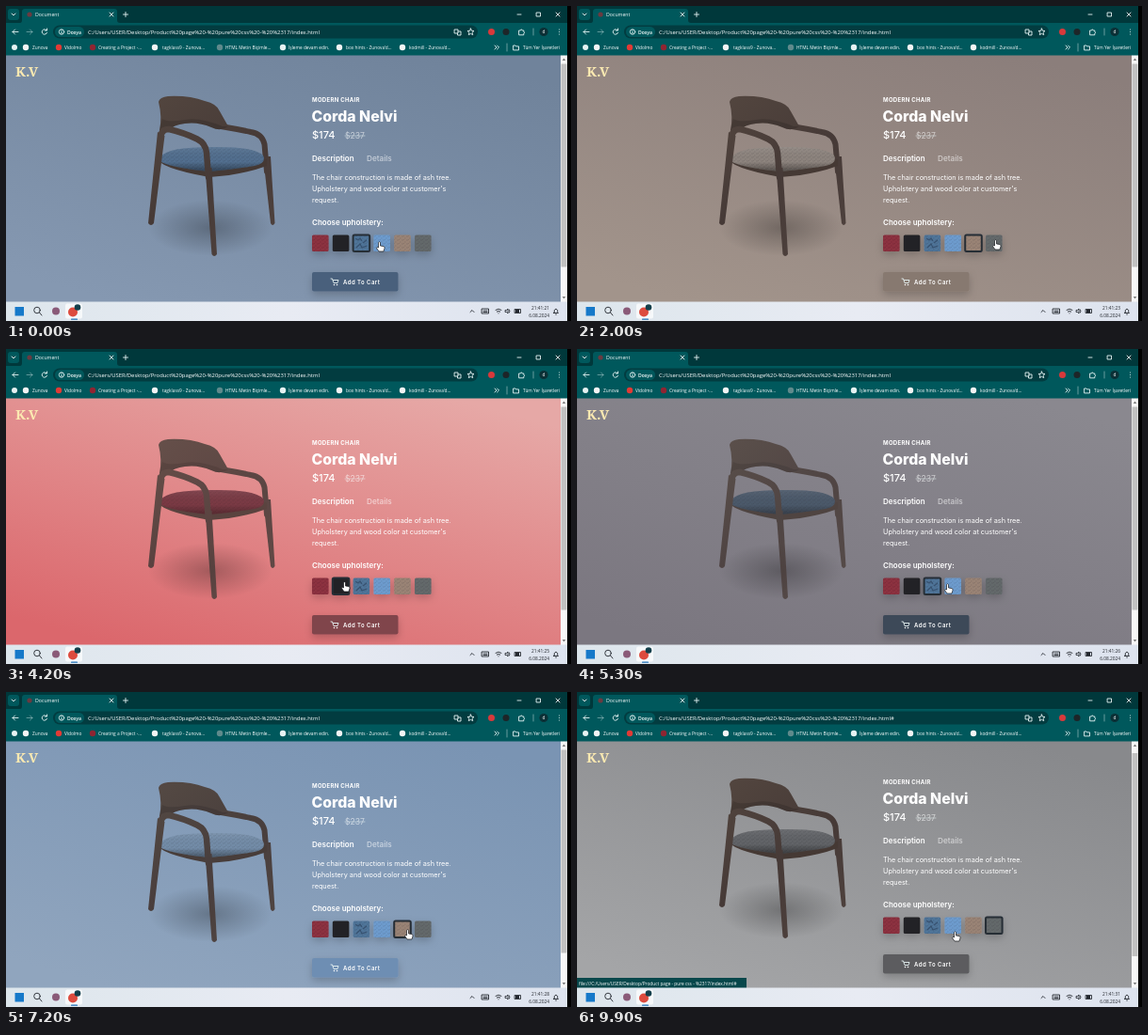
Recreate the animation shown at these times as an HTML page. Size 600 by 335 pixels, loop 10 s.

```html
<!DOCTYPE html>
<html lang="en">
<head>
<meta charset="utf-8">
<title>Product page</title>
<style>
  html, body { margin: 0; width: 100%; height: 100%; overflow: hidden; background: #000; }
  svg { display: block; width: 100vw; height: 100vh; }
  text { fill: #fff; white-space: pre; }
  .ui { font-family: "Open Sans", "Noto Sans", sans-serif; font-size: 4.8px; }
  .shop { font-family: Inter, "Open Sans", sans-serif; font-size: 7.3px; }
  .line { fill: none; stroke: #e6f2f2; stroke-width: .9; stroke-linecap: round; stroke-linejoin: round; }
  .dark { stroke: #23272e; }
  .wood { fill: none; stroke: url(#grain); stroke-linecap: round; stroke-linejoin: round; }
  #task text { fill: #20242b; text-anchor: end; }
</style>
</head>
<body>
<svg viewBox="0 0 600 335">
  <defs>
    <linearGradient id="sky" x1=".8" y1="0" x2=".2" y2="1">
      <stop id="skyTop"/><stop id="skyLow" offset="1"/>
    </linearGradient>
    <linearGradient id="grain" gradientUnits="userSpaceOnUse" x1="155" y1="95" x2="285" y2="265">
      <stop stop-color="#53463f"/><stop offset=".5" stop-color="#463a37"/><stop offset="1" stop-color="#4f423e"/>
    </linearGradient>
    <linearGradient id="shade" x2="0" y2="1">
      <stop stop-color="#fff" stop-opacity=".08"/><stop offset=".6" stop-opacity="0"/><stop offset="1" stop-opacity=".4"/>
    </linearGradient>
    <linearGradient id="bar">
      <stop stop-color="#dde6ec"/><stop offset=".5" stop-color="#e8ebf3"/><stop offset="1" stop-color="#dde3ee"/>
    </linearGradient>
    <radialGradient id="ground"><stop stop-opacity=".26"/><stop offset="1" stop-opacity="0"/></radialGradient>
    <pattern id="weave" width="5" height="4" patternUnits="userSpaceOnUse">
      <path d="M0 1h2M3 3h1.5M2.5 0v1" stroke="#000" stroke-opacity=".14" stroke-width=".7"/>
    </pattern>
    <filter id="soft" x="-30%" y="-60%" width="160%" height="260%">
      <feDropShadow dx="0" dy="3.500" stdDeviation="4.500" flood-opacity=".2"/>
    </filter>
    <path id="seat" d="M165 160Q171 150 218 150Q264 149 273 159Q277 167 264 170Q242 174 216 176Q177 172 165 166Z"/>
  </defs>

  <g id="page">
    <rect y="52" width="589" height="263" fill="url(#sky)"/>
    <g id="scroll">
      <ellipse cx="217" cy="236" rx="66" ry="30" fill="url(#ground)"/>
      <g id="chair">
        <path class="wood" stroke-width="6" d="M228 128Q246 131 260 134Q272 136 274.500 147L277 176"/>
        <path fill="url(#grain)" d="M273 160L281 160L285.500 231Q283 235 281 231Z"/>
        <path fill="#453934" d="M159.500 160Q160 172 216 182Q250 180 277 170V163L215 171Z"/>
        <use href="#seat" id="cushion"/>
        <use href="#seat" fill="url(#weave)"/>
        <use href="#seat" fill="url(#shade)"/>
        <path fill="url(#grain)" d="M162 102Q163 97 172 96Q195 95 211 101Q224 104 227 112L236 128Q228 134 218 129Q204 123 190 125Q178 126 172 133L163 132Q166 118 162 102Z"/>
        <path fill="#000" opacity=".14" d="M166 120Q172 124 190 121Q206 118 230 128L236 128Q228 134 218 129Q204 123 190 125Q178 126 172 133L163 132Z"/>
        <path fill="url(#grain)" d="M161 134L168.500 138L157 231Q154 235 151 231Z"/>
        <path class="wood" stroke-width="6.500" d="M164.500 139Q165 131 173 131Q190 135 203 141.500Q212 146 213 156L215 182"/>
        <path fill="url(#grain)" d="M211.500 172L218.500 172L224 264Q221 268 218.500 264Z"/>
      </g>
      <g class="shop">
        <text x="325" y="102" font-size="6" font-weight="700" letter-spacing=".3">MODERN CHAIR</text>
        <text x="324.500" y="122.500" font-size="15.800" font-weight="800">Corda Nelvi</text>
        <text x="325" y="141" font-size="11" font-weight="500">$174</text>
        <g opacity=".6">
          <text x="360" y="141" font-size="8.600">$237</text>
          <path class="line" d="M360 138H381"/>
          <text x="383" y="165" font-size="8.200" font-weight="500">Details</text>
        </g>
        <text x="325" y="165" font-size="8" font-weight="600">Description</text>
        <text x="325" y="185">The chair construction is made of ash tree.</text>
        <text x="325" y="197">Upholstery and wood color at customer's</text>
        <text x="325" y="209">request.</text>
        <text x="325" y="233" font-size="8" font-weight="600">Choose upholstery:</text>
        <g id="swatches" filter="url(#soft)"></g>
        <rect id="button" x="325" y="283" width="91.500" height="20.500" rx="2" filter="url(#soft)"/>
        <path class="line" d="M345 290h1.500l1.500 4.500h4l1-3h-5.500"/>
        <circle cx="348.500" cy="296.500" r=".8" fill="#fff"/><circle cx="351.500" cy="296.500" r=".8" fill="#fff"/>
        <text x="358" y="295.500" font-size="6" font-weight="600" letter-spacing=".45">Add To Cart</text>
      </g>
    </g>
    <text x="10" y="74.700" font-family="Noto Serif, serif" font-size="15" font-weight="900" style="fill:#fbe9b1">K.V</text>
    <rect x="589" y="52" width="7" height="263" fill="#f7f7f7"/>
    <path fill="#777" d="M590.800 58l1.700-2.500 1.700 2.500zM590.800 309l1.700 2.500 1.700-2.500z"/>
    <rect id="thumb" x="589.500" width="6" height="216" fill="#c1c1c1"/>
    <g id="status" class="ui">
      <rect y="304" width="180" height="11" fill="#07474b"/>
      <text x="2" y="311.500">file:///C:/Users/USER/Desktop/Product page - pure css - %2317/index.html#</text>
    </g>
  </g>

  <g id="browser" class="ui">
    <rect width="596" height="19" fill="#00383b"/>
    <path fill="#00585c" d="M0 18H596V52.500H0ZM15 18Q17 18 17 15V6Q17 3 20 3H115Q118 3 118 6V15Q118 18 121 18Z"/>
    <rect x="2" y="3" width="12" height="12" rx="3" fill="#00585c"/>
    <path class="line" d="M6 8l2 2 2-2M110 7l4 4m0-4l-4 4M127 6.500v5m-2.500-2.500h5M543 9h4M563.500 7h4v4h-4zM584 7l4 4m0-4l-4 4"/>
    <text x="31" y="11" font-size="5.200">Document</text>
    <rect x="50" y="20.500" width="451" height="14" rx="7" fill="#023c40"/>
    <rect x="52" y="22" width="31" height="11" rx="5.500" fill="#00585c"/>
    <path class="line" d="M13 27.500H7m2.500-2.500L7 27.500l2.500 2.500M43 25.800a2.700 2.700 0 1 0 .5 2.500M43.500 24v2h-2M59 27v2m0-3.500v.1"/>
    <path class="line" opacity=".45" d="M22 27.500h6m-2.500-2.500l2.500 2.500-2.500 2.500"/>
    <circle class="line" cx="59" cy="27.500" r="2.700"/>
    <text x="65" y="29.500" font-size="5.100" font-weight="600">Dosya</text>
    <text id="address" x="87" y="29.600" font-size="5.900"></text>
    <path class="line" d="M476.500 25h3.500v4h-3.500zM480 27h3v4h-3.500v-2M493.500 24l1 2.300 2.500.2-1.900 1.700.6 2.500-2.200-1.300-2.200 1.300.6-2.500-1.900-1.700 2.500-.2zM545 26h1.500q.8-2.500 1.700 0h1.600v1.500q2 .6 0 1.600v1.700H545z"/>
    <path class="line" opacity=".5" d="M560 24v7M532 40v8"/>
    <path class="line" d="M587.500 25v.1m0 2.400v.1m0 2.400v.1" stroke-width="1.200"/>
    <path class="line" d="M519 42l2 2-2 2m2.500-4l2 2-2 2M539 42h2l.8.900h2.700v4H539z"/>
    <circle cx="571" cy="27.500" r="4.600" fill="#0b3036"/>
    <text x="569.500" y="29.300">d</text>
  </g>

  <g id="task" class="ui">
    <rect y="314.500" width="596" height="20.500" fill="url(#bar)"/>
    <rect x="9.500" y="320" width="9.500" height="9.500" fill="#1679c9"/>
    <circle class="line dark" cx="33" cy="323.500" r="3.300" stroke-width="1.300"/>
    <path class="line dark" stroke-width="1.300" d="M35.500 326l2.500 3"/>
    <rect x="63" y="316.500" width="18" height="16" rx="2" fill="#fff" opacity=".7"/>
    <rect x="69" y="332.500" width="7" height="1.300" rx=".6" fill="#1f71b8"/>
    <path class="line dark" d="M493 325.500l2-2 2 2M505.500 322h7v5h-7zM507 324h4m-4 1.500h4M520 323.300q3-2.500 6 0M521.300 325q1.700-1.300 3.400 0M523 326.800v.1M530.500 323.500h1l1.500-1.500v5l-1.500-1.500h-1zM534.500 323q1 1.500 0 3M540.500 322.500h6v4h-6zM581.500 326.500h5l-.8-1v-2q-1.700-3-3.400 0v2zM583.700 328h.7" stroke-width=".8"/>
    <rect x="541" y="323" width="4" height="3" fill="#23272e"/>
    <text id="clock" x="577" y="322.500"></text>
    <text x="577" y="330.500">6.08.2024</text>
  </g>
  <path id="hand" fill="#fff" stroke="#16181c" stroke-width=".7" stroke-linejoin="round"
    d="M-2.500-4.500Q-1.500-6-.5-4.500V-1L3-.4Q4.300 0 4 1.500L3 5H-2L-4.500 1.500Q-4.500-.2-2.500 1Z"/>
</svg>
<script>
const $ = id => document.getElementById(id);
const clamp = x => Math.max(0, Math.min(1, x));
const smooth = x => x * x * (3 - 2 * x);

function add(parent, tag, attrs, text = "") {
  const el = document.createElementNS("http://www.w3.org/2000/svg", tag);
  for (const key in attrs) el.setAttribute(key, attrs[key]);
  el.textContent = text;
  return parent.appendChild(el);
}
const dot = (parent, cx, cy, r, fill) => add(parent, "circle", { cx, cy, r, fill });

// page top, page bottom, cushion, button, swatch
const themes = [
  ["#f2acaa", "#ea666b", "#85303f", "#a6505a", "#8c303f"],
  ["#938a8b", "#776c6f", "#2b2b2e", "#29292c", "#232426"],
  ["#70839b", "#8598b1", "#526f8f", "#4a607b", "#507499"],
  ["#7995b5", "#8fa6c0", "#718dac", "#6c90ba", "#6d9bcd"],
  ["#8b7e7a", "#a2948b", "#8d847e", "#87796f", "#998375"],
  ["#88898c", "#a4a5a7", "#626468", "#5b5c5e", "#64696b"]
].map(row => row.map(hex => [1, 3, 5].map(i => parseInt(hex.slice(i, i + 2), 16))));
const rgb = c => `rgb(${c.map(Math.round)})`;
const mix = (a, b, k) => rgb(a.map((v, i) => v + (b[i] - v) * k));

// time of click, theme
const clicks = [[-900, 2], [150, 3], [1150, 4], [2150, 5], [3100, 0], [4000, 1], [5000, 2], [6050, 3], [7100, 4], [8150, 5]];
// time, x, y
const path = [
  [0, 398, 256], [250, 400, 256], [900, 421, 256], [1250, 424, 256], [2000, 446, 254], [2250, 447, 254],
  [2950, 336, 253], [3200, 337, 253], [3800, 357, 253], [4200, 361, 253], [4800, 377, 254], [5050, 380, 254],
  [5300, 395, 255], [6150, 400, 256], [6850, 421, 257], [7200, 428, 258], [8000, 441, 258], [8250, 443, 258],
  [8950, 386, 292], [9300, 385, 292], [9900, 403, 260], [10000, 403, 260]
];
const submitAt = 9200;

const bookmarks = [
  [21, 28, "Zunova", "#f4f4f4"], [56, 62, "Vidolmo", "#e23a35"], [92, 98, "Creating a Project -...", "#8f2532"],
  [158, 166, "tagklass9 - Zunova...", "#f4f4f4"], [227, 233, "HTML Metin Biçimle...", "#5f8a8c"],
  [294, 300, "İşleme devam edin.", "#e6f2f2"], [354, 361, "box hints - Zunova'd...", "#f4f4f4"],
  [421, 428, "kodmill - Zunova'd...", "#f4f4f4"]
];
for (const [icon, x, label, color] of bookmarks) {
  dot($("browser"), icon, 44, 3.2, color);
  add($("browser"), "text", { x, y: 45.8 }, label);
}
add($("browser"), "text", { x: 549, y: 45.8 }, "Tüm Yer İşaretleri");
dot($("browser"), 9, 44, 3, "#e6f2f2");
dot($("browser"), 25, 9, 2.6, "#6b3a40");
dot($("browser"), 515.5, 27.5, 3.5, "#d8393b");
dot($("browser"), 531, 27.5, 3.5, "#1d2528");
dot($("task"), 53, 324.5, 4, "#8a5a78");
dot($("task"), 71, 325.5, 5, "#dd4b3e");
dot($("task"), 76, 320.5, 3.3, "#123f4b");

const swatches = themes.map((theme, i) => {
  const box = { x: 325 + i * 21.8, y: 243.5, width: 17.6, height: 17.6, rx: 1.5 };
  add($("swatches"), "rect", { ...box, fill: rgb(theme[4]) });
  if (i !== 1) add($("swatches"), "rect", { ...box, fill: "url(#weave)" });
  if (i === 2) add($("swatches"), "path", {
    d: "M371 247l3 2 2-2 2 3M379 252l4-3M372 257l4-4 2 4 5-2", fill: "none", stroke: "#2c4460", "stroke-width": 1.2, opacity: .7
  });
  return add($("swatches"), "rect", { ...box, fill: "none", stroke: "#252d36", "stroke-width": 2 });
});

function pointer(t) {
  const i = Math.max(1, path.findIndex(p => p[0] > t));
  const [a, b] = [path[i - 1], path[i]];
  const k = smooth((t - a[0]) / (b[0] - a[0]));
  return [1, 2].map(n => a[n] + (b[n] - a[n]) * k);
}

function draw(t) {
  const step = clicks.filter(c => c[0] <= t).length - 1;
  const [since, current] = clicks[step];
  const next = themes[current], last = themes[clicks[Math.max(0, step - 1)][1]];
  const fade = duration => smooth(clamp((t - since) / duration));
  const slow = fade(900), quick = fade(550);

  $("skyTop").setAttribute("stop-color", mix(last[0], next[0], slow));
  $("skyLow").setAttribute("stop-color", mix(last[1], next[1], slow));
  $("cushion").setAttribute("fill", mix(last[2], next[2], quick));
  $("button").setAttribute("fill", mix(last[3], next[3], quick));
  $("chair").setAttribute("opacity", 1 - .17 * Math.sin(Math.PI * quick));
  swatches.forEach((s, i) => s.setAttribute("visibility", i === current ? "visible" : "hidden"));

  const submitted = t >= submitAt;
  $("scroll").setAttribute("transform", `translate(0 ${submitted ? -4 : 0})`);
  $("thumb").setAttribute("y", submitted ? 65 : 61.5);
  $("status").setAttribute("visibility", t >= 8800 ? "visible" : "hidden");
  $("address").textContent = "C:/Users/USER/Desktop/Product%20page%20-%20pure%20css%20-%20%2317/index.html" + (submitted ? "#" : "");
  $("clock").textContent = "21:41:" + (21 + Math.floor((t + 300) / 1000));
  $("hand").setAttribute("transform", `translate(${pointer(t)})`);
}

const start = performance.now();
function tick() {
  draw((performance.now() - start) % 10000);
  requestAnimationFrame(tick);
}
tick();
</script>
</body>
</html>
```
